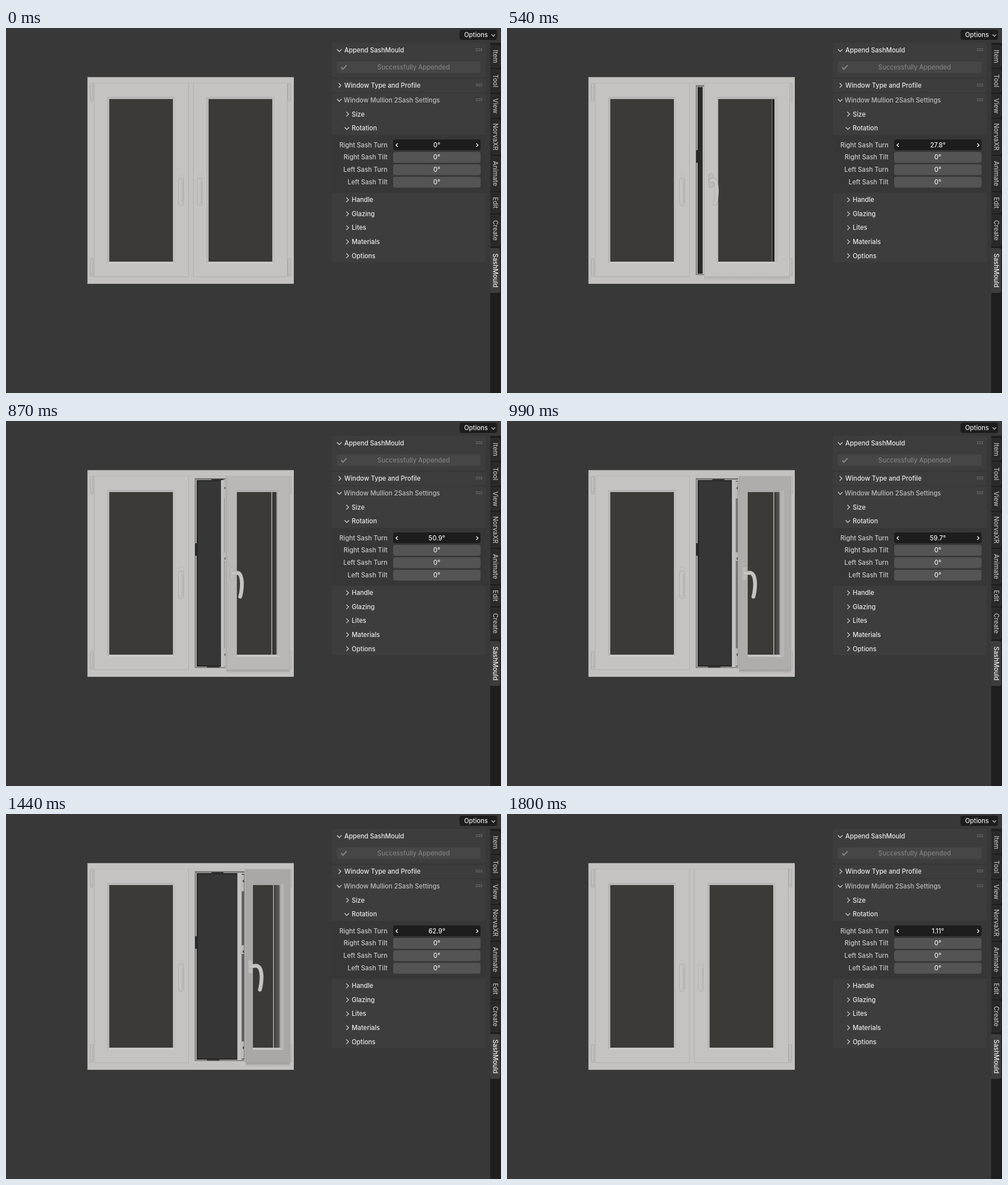
Animation, 872 px wide and 642 px high, one loop 1.86 s. Source, as an HTML page with a canvas:

```html
<!DOCTYPE html>
<html lang="en">
<head>
<meta charset="utf-8">
<title>Sash turn</title>
<style>
html, body { margin: 0; width: 100%; height: 100%; overflow: hidden; background: #383838; }
canvas { display: block; width: 872px; height: 642px; }
</style>
</head>
<body>
<canvas id="stage" width="872" height="642"></canvas>
<script>
const c = document.getElementById('stage').getContext('2d');
const LOOP = 1860, TICK = 30, LAG = 7;

// Ticks at which the view refreshes, and the dragged angle over time
const ticks = [0, 3, 5, 6, 8, 9, 11, 12, 14, 15, 17, 18, 20,
  22, 23, 25, 27, 28, 29, 31, 32, 33, 35, 36, 38, 39,
  46, 47, 48, 49, 50, 52, 53, 55, 56, 58, 60];
const keys = [[0, 0], [75, 0], [90, 1], [300, 12.5], [540, 27.8], [750, 42.1], [990, 59.7],
  [1170, 74], [1350, 74], [1380, 72.5], [1410, 69], [1440, 62.9], [1500, 49], [1590, 26.3],
  [1680, 11], [1740, 4.6], [1800, 1.11], [LOOP, 0]];

function angleAt(t) {
  if (t <= 0) return 0;
  const i = keys.findIndex(k => k[0] >= t);
  const [t0, a0] = keys[i - 1], [t1, a1] = keys[i];
  return a0 + (a1 - a0) * (t - t0) / (t1 - t0);
}

const mix = (a, b, k) => a + (b - a) * Math.max(0, Math.min(1, k));
const gray = (v, warm = 0) => `rgb(${v},${v - warm / 2},${v - warm})`;

function box(x0, y0, x1, y1, fill) {
  c.fillStyle = fill;
  c.fillRect(x0, y0, x1 - x0, y1 - y0);
}

function round(x0, y0, x1, y1, r, fill, stroke) {
  c.beginPath();
  c.roundRect(x0, y0, x1 - x0, y1 - y0, r);
  if (fill) { c.fillStyle = fill; c.fill(); }
  if (stroke) { c.strokeStyle = stroke; c.lineWidth = 1; c.stroke(); }
}

function line(points, color, width = 1) {
  c.beginPath();
  points.forEach(([x, y]) => c.lineTo(x, y));
  c.strokeStyle = color;
  c.lineWidth = width;
  c.stroke();
}

function text(s, x, y, color = '#e8e8e8', align = 'left') {
  c.font = '500 11.25px Inter, "Liberation Sans", sans-serif';
  c.textAlign = align;
  c.textBaseline = 'alphabetic';
  c.fillStyle = color;
  c.fillText(s, x, y + 4);
}

function chevron(x, y, dir, size = 4, color = '#cfcfcf') {
  const h = size / 2;
  const p = { down: [[-size, -h], [0, h], [size, -h]],
    right: [[-h, -size], [h, 0], [-h, size]],
    left: [[h, -size], [-h, 0], [h, size]] }[dir];
  line(p.map(([a, b]) => [x + a, y + b]), color, 1.3);
}

function quad(points, fill) {
  c.beginPath();
  points.forEach(([x, y]) => c.lineTo(x, y));
  c.closePath();
  c.fillStyle = fill;
  c.fill();
}

// Sloped glazing rim: outer x0..x1, inner g0..g1
function rim(x0, x1, g0, g1, dark) {
  const t = 121, b = 415, gt = 125, gb = 411;
  quad([[x0, t], [x1, t], [g1, gt], [g0, gt]], gray(184 - dark, 3));
  quad([[x0, b], [x1, b], [g1, gb], [g0, gb]], gray(203 - dark / 3, 3));
  quad([[x0, t], [g0, gt], [g0, gb], [x0, b]], gray(183 - dark, 3));
  quad([[x1, t], [g1, gt], [g1, gb], [x1, b]], gray(190 - dark / 2, 3));
  box(g0, gt, g1, gb, '#3b3a37');
}

function hinge(x, y) {
  round(x + .5, y + .5, x + 5.5, y + 31.5, 1, '#c0bfbd', '#a8a7a5');
  line([[x, y + 27.5], [x + 6, y + 27.5]], '#aeadab');
}

function closedHandle(x, alpha = 1) {
  c.save();
  c.globalAlpha = alpha;
  round(x - 4, 257, x + 4, 288, 4, '#c5c4c2', '#bbbab8');
  round(x - 4.5, 263, x + 4.5, 313, 5, '#c1c0be', '#adaca9');
  line([[x - 2.5, 268], [x - 2, 306]], '#cccbc9', 1.5);
  line([[x + 3.2, 270], [x + 2.5, 308]], '#b2b1af', 1.2);
  c.restore();
}

function openHandle(x, s, alpha) {
  const reach = 22 * s, tip = x + reach;
  c.save();
  c.globalAlpha = alpha;
  round(x - 4, 256, x + 4, 281, 4, '#bdbcba', '#acaba8');
  const hook = (color, w) => {
    c.beginPath();
    c.moveTo(x, 268);
    c.lineTo(x + reach * .45, 267);
    c.quadraticCurveTo(tip - 1, 266, tip, 285);
    c.quadraticCurveTo(tip, 299, tip - 3, 309);
    c.strokeStyle = color;
    c.lineWidth = w;
    c.lineCap = c.lineJoin = 'round';
    c.stroke();
  };
  hook('#a5a4a1', 7);
  hook('#c6c5c3', 5.6);
  c.restore();
}

function frame() {
  box(143.5, 86.4, 507, 450, '#c3c2c0');
  box(143.5, 449, 507, 450, '#bbbab8');
  box(155, 96, 496, 97, '#b9b8b6');
  [[148, 97], [148, 405]].forEach(([x, y]) => hinge(x, y));
  box(155, 97, 321, 438, '#c4c3c1');
  line([[155.5, 97], [155.5, 437.5], [321.5, 437.5], [321.5, 97]], '#b0afad');
  rim(178, 298, 182, 294, 0);
  closedHandle(308.5);
}

function opening(xl, a) {
  const tone = mix(38, 54, (a - 22) / 22);
  box(332, 100, 494, 435, '#a5a4a1');
  box(333, 101, 494, 434, '#72716f');
  box(334, 103, 494, 433, '#aaa9a6');
  box(336, 104, 494, 432, '#242424');
  box(338, 106, 494, 430, gray(tone));
  box(333, 215, 337, 237, '#292929');
  if (xl > 384) {
    box(362, 102, Math.min(383, xl), 105, '#303030');
    box(354, 432, 376, 434, '#424242');
  }
}

function edge(xl, s) {
  const w = 19 * Math.pow(s, 2.6), x = xl - w;
  box(x - 1, 104, x, 432, '#292929');
  box(x, 104, xl, 433, '#c4c3c1');
  if (w < 5) return;
  box(x + w * .52, 105, xl - 2, 432, gray(mix(185, 90, (w - 8) / 7)));
  box(xl - 2, 98, xl, 437, '#b5b4b2');
  [[107, 136], [231, 246], [400, 430]].forEach(([y0, y1]) => {
    box(x + w * .4, y0, x + w * .8, y1, '#bbbab8');
    box(x + w * .65, y0 + 9, x + w * .8, y0 + 13, '#535250');
  });
}

function sash(a) {
  const r = a * Math.PI / 180, s = Math.sin(r), k = Math.cos(r);
  const at = v => 496 - v * 166.5 * k + (5 - 7 * v) * s;
  const xl = at(1), xr = at(0);
  const dark = mix(0, 27, (a - 42) / 22);

  if (xl > 333) {
    opening(xl, a);
    edge(xl, s);
  }
  // Soft shade the open leaf casts on the lower frame
  if (a > 8) {
    const g = c.createLinearGradient(0, 438, 0, 444);
    g.addColorStop(0, `rgba(90,88,84,${.36 * s})`);
    g.addColorStop(1, 'rgba(90,88,84,0)');
    box(xl, 438, xr, 444, g);
  }
  hinge(mix(496, 497.5, s), 97);
  hinge(mix(496, 497.5, s), 405);

  box(xl, 97, xr, 438, gray(196 - dark, 3));
  line([[xl + .5, 97], [xl + .5, 437.5], [xr - .5, 437.5], [xr - .5, 97]], gray(175 - dark / 2, 3));

  const g0 = at(.835), g1 = at(.162) - 6 * s;
  rim(mix(at(.859), g0, s * 1.2), at(.138), g0, g1, dark * .6);
  const w = 13.5 * Math.pow(s, 1.3);
  if (w > 2) {
    box(g1 - w, 125, g1, 411, gray(mix(30, 82, (a - 36) / 28)));
    box(g1 - w, 125, g1 - w + 1.5, 411, gray(mix(95, 180, (a - 25) / 15)));
    if (w > 7) {
      box(g1 - w + 2, 125, g1 - w + 4, 411, '#353534');
      box(g1 - 1, 125, g1, 411, '#999896');
    }
  }

  const open = Math.max(0, Math.min(1, (a - 4) / 12));
  const hx = at(.928);
  if (open < 1) closedHandle(hx, (1 - open) * (a > 0 ? .7 : 1));
  if (open > 0) openHandle(hx + 3 * s, s, open);
}

function grip(y) {
  for (let i = 0; i < 8; i++) {
    const x = 828 + (i % 4) * 3;
    box(x, y - 2 + (i >> 2) * 3, x + 1.3, y - .7 + (i >> 2) * 3, '#9a9a9a');
  }
}

const tabs = [['Item', 31, 69], ['Tool', 73, 113], ['View', 117, 157], ['NorvaXR', 161, 222],
  ['Animate', 226, 286], ['Edit', 290, 325], ['Create', 329, 383], ['SashMould', 387, 466]];

function sidebar() {
  box(853, 26, 872, 642, '#1e1e1e');
  tabs.forEach(([name, y0, y1], i) => {
    const on = i === tabs.length - 1;
    round(853, y0, 870.5, y1, [0, 4, 4, 0], on ? '#3d3d3d' : '#292929', on ? null : '#353535');
    c.save();
    c.translate(861.5, (y0 + y1) / 2);
    c.rotate(Math.PI / 2);
    text(name, 0, 0, on ? '#f0f0f0' : '#bdbdbd', 'center');
    c.restore();
  });
}

function panel(angle) {
  round(799, 3, 865, 21, 4, '#1d1d1d');
  text('Options', 807, 12);
  chevron(858.5, 13, 'down', 3.2);

  round(574, 26, 845, 87, 4, '#3d3d3d');
  round(574, 90, 845, 113, 4, '#3d3d3d');
  round(574, 115, 845, 412, 4, '#3d3d3d');
  box(574, 188, 845, 290, '#373737');
  [38, 100, 126].forEach(grip);

  chevron(587, 39.5, 'down');
  text('Append SashMould', 596, 39);
  round(583, 59, 836, 79, 3, '#464646');
  line([[590.5, 69], [593.5, 72.5], [600, 65.5]], '#858585', 2);
  text('Successfully Appended', 718, 69, '#808080', 'center');
  chevron(588, 101, 'right');
  text('Window Type and Profile', 596, 101);
  chevron(587, 127, 'down');
  text('Window Mullion 2Sash Settings', 595, 127, '#bcbcbc');
  chevron(601.5, 151.5, 'right');
  text('Size', 609, 152);
  chevron(600.5, 176.5, 'down');
  text('Rotation', 609, 176);

  ['Right Sash Turn', 'Right Sash Tilt', 'Left Sash Turn', 'Left Sash Tilt'].forEach((name, i) => {
    const y = 205.5 + i * 21.9;
    text(name, 672, y, '#c9c9c9', 'right');
    round(682, y - 9.5, 836, y + 9.5, 4, i ? '#545454' : '#1d1d1d');
    const value = i || !angle ? '0' : angle.toPrecision(3);
    text(value + '°', 759, y, '#eeeeee', 'center');
  });
  chevron(688.5, 206, 'left', 3, '#ffffff');
  chevron(830, 206, 'right', 3, '#ffffff');

  ['Handle', 'Glazing', 'Lites', 'Materials', 'Options'].forEach((name, i) => {
    const y = 302.3 + i * 24.55;
    chevron(601.5, y, 'right');
    text(name, 609, y);
  });
}

function draw(now) {
  const tick = Math.floor((now % LOOP) / TICK);
  const t = TICK * ticks.filter(k => k <= tick).pop();
  box(0, 0, 872, 642, '#383838');
  frame();
  sash(angleAt(t - LAG));
  sidebar();
  panel(angleAt(t));
}

const start = performance.now();
function loop() {
  draw(performance.now() - start);
  requestAnimationFrame(loop);
}
loop();
</script>
</body>
</html>
```
